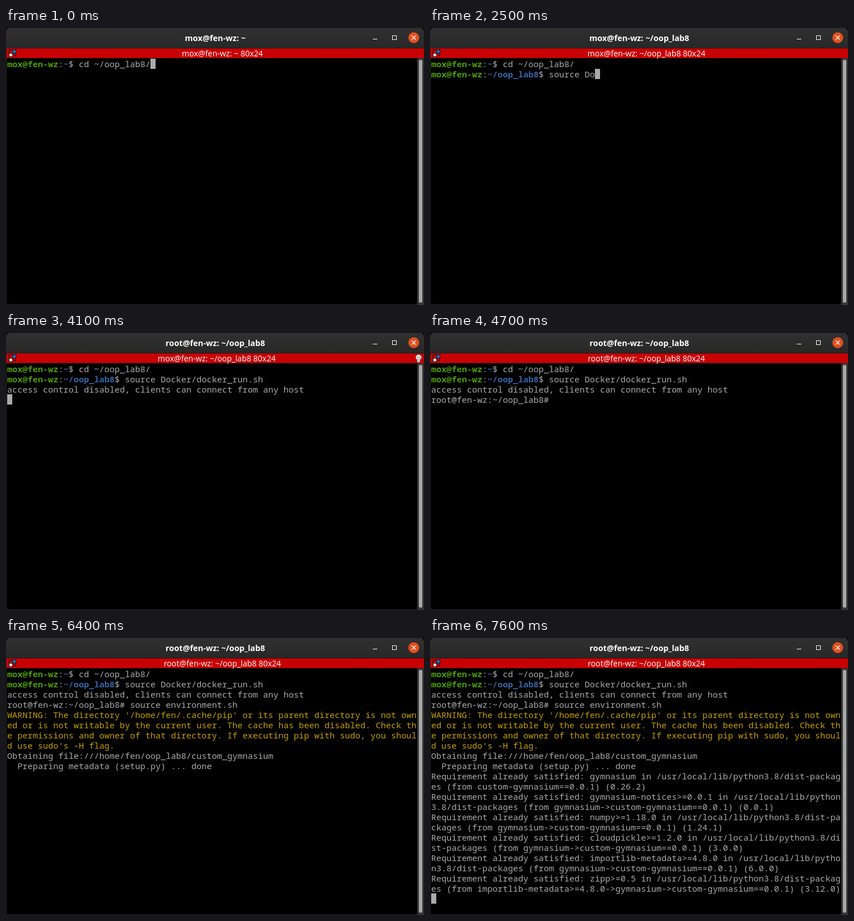
An HTML page that plays this animation: 735 by 488 pixels, repeating every 8 s.

```html
<!DOCTYPE html>
<html lang="en">
<head>
<meta charset="utf-8">
<title>Terminal</title>
<style>
html, body { margin: 0; width: 100%; height: 100%; overflow: hidden; background: #000; }
svg { position: absolute; left: 0; top: 0; }
svg text { fill: #fff; text-anchor: middle; font: 14px "Open Sans", sans-serif; }
#title { font-weight: bold; font-size: 14.3px; }
pre { position: absolute; left: 2px; top: 54px; margin: 0; color: #aaa;
  font: 15px/18px "Noto Sans Mono", monospace; font-variant-ligatures: none; }
b { color: #4e9a06; }
b.dir { color: #3465a4; }
em { color: #c4a000; font-style: normal; }
i { display: inline-block; width: 9px; height: 18px; vertical-align: top; background: #aaa; }
</style>
</head>
<body>
<svg width="735" height="488">
  <defs>
    <linearGradient id="head" x2="0" y2="1">
      <stop stop-color="#303030"/><stop offset="1" stop-color="#282828"/>
    </linearGradient>
  </defs>
  <path d="M0 36V7Q0 0 7 0H728Q735 0 735 7V36Z" fill="url(#head)"/>
  <path d="M0 35.5H735" stroke="#1c1c1c"/>
  <path d="M.5 36V488M0 487.5H735" stroke="#2a2a2a"/>
  <rect x="1" y="36" width="734" height="17" fill="#c80003"/>
  <rect x="723" y="53" width="12" height="435" fill="#353535"/>
  <rect x="726" y="56" width="6" height="428" rx="3" fill="#a9a9a9"/>

  <path d="M645 19.5H653" stroke="#fff"/>
  <rect x="679.5" y="13.5" width="7" height="7" fill="none" stroke="#fff"/>
  <circle cx="717" cy="17" r="9.5" fill="#e2501f"/>
  <path d="M713.5 13.5L720.5 20.5M720.5 13.5L713.5 20.5" stroke="#fff" stroke-width="1.3"/>

  <g stroke="#111">
    <rect x="5.5" y="38.5" width="6" height="6" fill="#c80003"/>
    <rect x="11.5" y="38.5" width="6" height="6" fill="#1a6fc4"/>
    <rect x="5.5" y="44.5" width="6" height="6" fill="#d8d8d0"/>
  </g>
  <path d="M13 47H18L15.5 50Z" fill="#111"/>

  <g id="bulb">
    <circle cx="725.5" cy="43" r="5" fill="#e8e8e8" stroke="#777"/>
    <path d="M723.5 45V42L725.5 43.5L727.5 42V45" fill="none" stroke="#888"/>
    <rect x="723" y="47" width="5" height="4.5" rx="1" fill="#ddd" stroke="#666" stroke-width=".7"/>
  </g>
  <text id="title" x="368" y="23"></text>
  <text id="bar" y="50"></text>
</svg>
<pre id="screen"></pre>
<script>
const LOOP = 8000;
const $ = id => document.getElementById(id);
const host = 'fen-wz', dir = '~/oop_lab8';
const home = `mox@${host}: ~`, lab = `mox@${host}: ${dir}`, root = `root@${host}: ${dir}`;

const prompt = path => `<b>mox@${host}</b>:<b class="dir">${path}</b>$ `;
const wrap = s => s.replace(/.{80}(?=.)/g, '$&\n') + '\n';
const req = (pkg, version, via = 'gymnasium->') => wrap(
  `Requirement already satisfied: ${pkg} in /usr/local/lib/python3.8/dist-packages ` +
  `(from ${via}custom-gymnasium==0.0.1) (${version})`);

const warning = '<em>' + wrap(
  "WARNING: The directory '/home/fen/.cache/pip' or its parent directory is not owned " +
  'or is not writable by the current user. The cache has been disabled. Check the ' +
  'permissions and owner of that directory. If executing pip with sudo, you should ' +
  "use sudo's -H flag.") + '</em>';

const packages = req('gymnasium', '0.26.2', '') +
  req('gymnasium-notices>=0.0.1', '0.0.1') +
  req('numpy>=1.18.0', '1.24.1') +
  req('cloudpickle>=1.2.0', '3.0.0') +
  req('importlib-metadata>=4.8.0', '6.0.0') +
  req('zipp>=0.5', '3.12.0', 'importlib-metadata>=4.8.0->gymnasium->');

// [time, text added, cursor shown]
const steps = [
  [0, prompt('~') + 'cd ~/oop_lab8/', 1],
  [100, '', 0],
  [800, '', 1],
  [1300, '\n' + prompt(dir), 1],
  [1600, 's', 1],
  [1700, 'o', 1],
  [1800, 'u', 0],
  [2000, 'rce ', 1],
  [2300, 'D', 1],
  [2500, 'o', 1],
  [2600, 'cker/', 1],
  [3000, 'do', 1],
  [3200, 'c', 1],
  [3300, 'ker_', 1],
  [3700, 'r', 1],
  [3800, 'un.sh ', 1],
  [4100, '\naccess control disabled, clients can connect from any host\n', 1],
  [4300, `root@${host}:${dir}# `, 1],
  [4700, '', 0],
  [5000, 's', 1],
  [5100, 'ou', 1],
  [5200, 'rce', 1],
  [5300, ' e', 1],
  [5500, 'n', 1],
  [5600, 'vironment.sh ', 1],
  [5700, '\n', 1],
  [5900, warning, 1],
  [6200, 'Obtaining file:///home/fen/oop_lab8/custom_gymnasium\n', 1],
  [6300, '  Preparing metadata (setup.py) ... ', 0],
  [6400, 'done\n', 0],
  [6500, packages, 1],
  [7200, '', 0],
  [7600, '', 1]
];

let shown = '';
function draw() {
  const t = performance.now() % LOOP;
  const past = steps.filter(s => s[0] <= t);
  const html = past.map(s => s[1]).join('') + (past.at(-1)[2] ? '<i></i>' : '');
  if (html !== shown) $('screen').innerHTML = shown = html;

  const bell = t >= 3400 && t < 4300;
  $('title').textContent = t < 1300 ? home : t < 4100 ? lab : root;
  $('bar').textContent = (t < 1000 ? home : t < 4300 ? lab : root) + ' 80x24';
  $('bar').setAttribute('x', bell ? 370.5 : 380.5);
  $('bulb').style.display = bell ? '' : 'none';
  requestAnimationFrame(draw);
}
draw();
</script>
</body>
</html>
```
